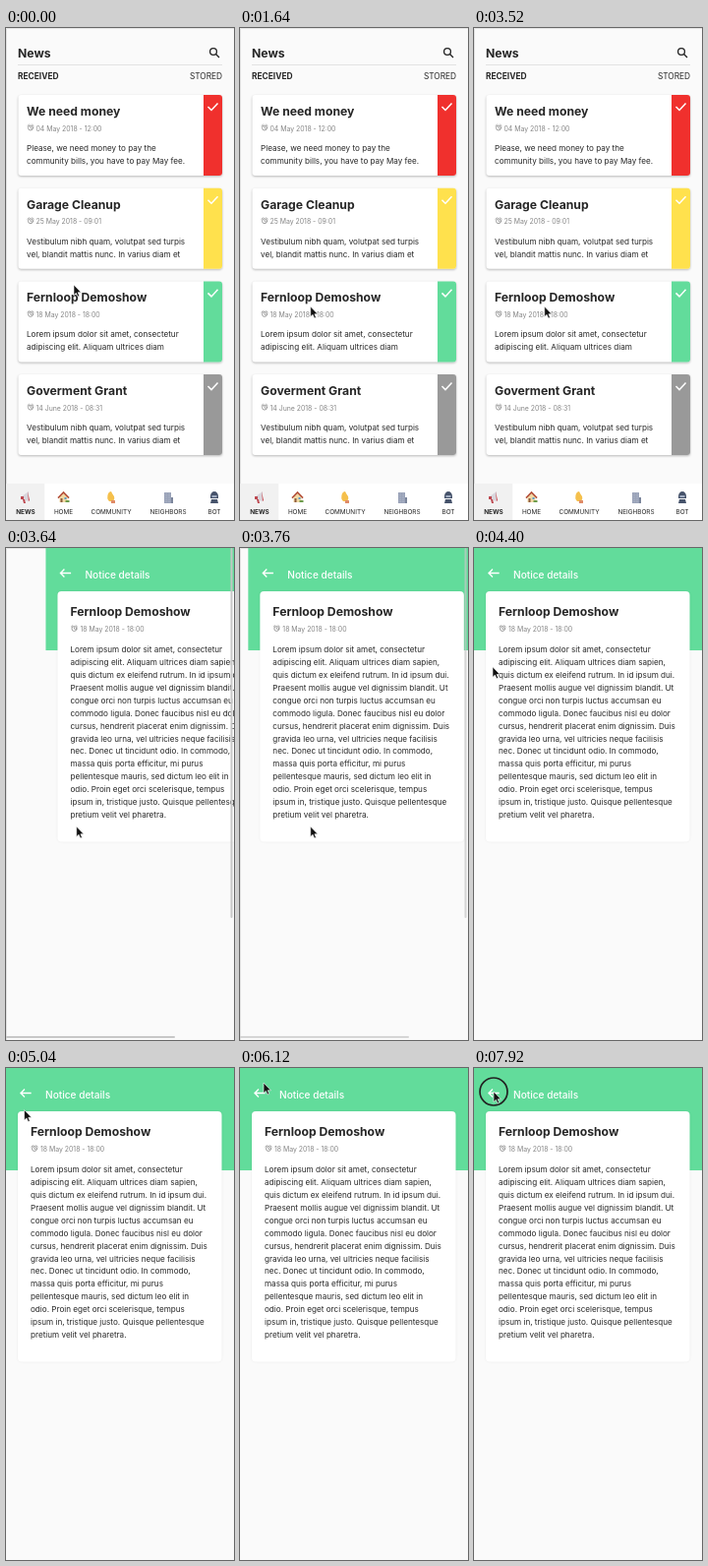
Write an HTML page that moves like this. It is 232 px wide and 500 px high and loops after 8000 ms.

```html
<!DOCTYPE html>
<html lang="en">
<head>
<meta charset="utf-8">
<title>News</title>
<style>
  html, body { margin: 0; overflow: hidden; background: #fafafa; }
  svg { display: block; width: 232px; height: 500px; font-family: Inter, sans-serif; }
  text { fill: #262626; white-space: pre; }
  .title { font-size: 12.2px; font-weight: 700; }
  .body { font-size: 8.15px; }
  .date { font-size: 6.9px; fill: #848484; }
  .tab { font-size: 6.4px; text-anchor: middle; }
  .card { fill: #fff; filter: drop-shadow(0 1px 1px #0004); }
  .line { fill: none; stroke-linecap: square; }
</style>
</head>
<body>
<svg viewBox="0 0 232 500">
  <rect width="232" height="500" fill="#fafafa"/>
  <path d="M.5 500V.5H232" fill="none" stroke="#e4e4e4"/>
  <g id="list">
    <text class="title" x="12" y="29.5">News</text>
    <g class="line" stroke="#222" stroke-width="1.3">
      <circle cx="211" cy="24" r="3.4"/><path d="M214 27l2.5 2.5"/>
    </g>
    <path d="M12 37.5H220" stroke="#e2e2e2"/>
    <text x="12" y="52" font-size="8.4" font-weight="700">RECEIVED</text>
    <text x="220" y="52" font-size="8.3" text-anchor="end">STORED</text>
    <g id="cards"></g>
    <path d="M0 463H232V500H0z" fill="#fff"/>
    <path d="M0 463H39.300V500H0z" fill="#f1f1f1"/>
    <g id="tabs"></g>
    <g transform="translate(20 477)">
      <path d="M-4 -1L3 -6V4L-4 2z" fill="#d9d6dc"/><path d="M2 -6l2 9-1 1z" fill="#c9424a"/>
      <path d="M-5 -1l3 0v3l-3 0zM-3 2l2 0 1 4h-2z" fill="#bd4850"/>
    </g>
    <g transform="translate(58.500 477)">
      <path d="M-4 -1L0 -5 4 -1V5H-4z" fill="#f2d9a5"/><path d="M-5 0L0 -5 5 0" class="line" stroke="#b5523c" stroke-width="1.6"/>
      <path d="M-3 1h2v4h-2z" fill="#8c5a3c"/><path d="M1 0h2v2h-2z" fill="#5a9ccb"/><path d="M2 3h4v2H2z" fill="#6c9c4c"/>
    </g>
    <g transform="translate(107 477)">
      <path d="M-3 -4q3 -4 4 0l2 3q1 4-2 5h-3q-3-3-1-8z" fill="#f5c04c"/><path d="M0 3h4v3H0z" fill="#df8b68"/>
    </g>
    <g transform="translate(165 477)">
      <path d="M-4 -5H3V6H-4z" fill="#99a2b8"/><path d="M3 0H5V6H3z" fill="#7b859b"/>
      <path d="M-2 -4V5M1 -4V5" stroke="#b4bccd" stroke-dasharray="1 1"/>
    </g>
    <g transform="translate(212 477)">
      <path d="M-4 -1a4 5 0 0 1 8 0v2h-8zM-3 2h6l1 4h-8z" fill="#46536b"/><path d="M-2.500 -1h5" stroke="#bdc9dc" stroke-width="1.5"/>
    </g>
  </g>
  <g id="details">
    <path d="M0 0H232V104H0z" fill="#62dc9b"/>
    <path d="M0 104H232V500H0z" fill="#fafafa"/>
    <path d="M25 25.500H15M18.500 22l-3.500 3.500 3.500 3.500" class="line" stroke="#fff" stroke-width="1.3"/>
    <text x="40" y="30.500" font-size="10.100" font-weight="500" style="fill:#fff">Notice details</text>
    <rect class="card" style="filter:drop-shadow(0 0 1px #0001)" x="12" y="44" width="207.500" height="254.500" rx="4"/>
    <g id="article"></g>
  </g>
  <g id="bars" fill="#c6c6c6">
    <rect y="496" width="172" height="2" rx="1"/>
    <rect x="228.500" width="2" height="376" rx="1"/>
  </g>
  <circle id="ring" r="14" fill="none" stroke="#222" stroke-width="1.700"/>
  <path id="cursor" d="M0 0V10.500L2.400 8.300 4 12 5.700 11.200 4.200 7.700H7.400z" fill="#111" stroke="#fff" stroke-width=".6"/>
</svg>
<script>
const $ = id => document.getElementById(id);
const text = (cls, x, y, s, extra = '') => `<text class="${cls}" x="${x}" y="${y}" ${extra}>${s}</text>`;
const clock = (x, y) => `<g class="line" stroke="#888" stroke-width=".8">
  <circle cx="${x}" cy="${y}" r="2.500"/><path d="M${x} ${y - 1.2}v1.400l1 .6M${x - 3} ${y - 2}l1.300-1.200M${x + 3} ${y - 2}l-1.300-1.200"/></g>`;

const vestibulum = ['Vestibulum nibh quam, volutpat sed turpis', 'vel, blandit mattis nunc. In varius diam et'];
const event = 'Fernloop Demoshow', eventDate = '18 May 2018 - 18:00';
const news = [
  ['We need money', '04 May 2018 - 12:00', '#f0302d',
    ['Please, we need money to pay the', 'community bills, you have to pay May fee.']],
  ['Garage Cleanup', '25 May 2018 - 09:01', '#ffe14d', vestibulum],
  [event, eventDate, '#62dc9b',
    ['Lorem ipsum dolor sit amet, consectetur', 'adipiscing elit. Aliquam ultrices diam']],
  ['Goverment Grant', '14 June 2018 - 08:31', '#999', vestibulum]
];
$('cards').innerHTML = news.map(([title, date, color, lines], i) => `
  <g transform="translate(12.500 ${68 + i * 94.7})">
    <rect class="card" width="207.500" height="82" rx="3"/>
    <path d="M188.500 0h16q3 0 3 3v76q0 3-3 3h-16z" fill="${color}"/>
    <path d="M193.500 12.500l3 3 6-6.500" class="line" stroke="#fff" stroke-width="1.500"/>
    ${text('title', 8.5, 21, title)}${clock(12.5, 33.5)}${text('date', 18, 36.7, date)}
    ${lines.map((s, n) => text('body', 8.5, 57 + n * 13, s)).join('')}
  </g>`).join('');

$('tabs').innerHTML = [['NEWS', 20], ['HOME', 58.5], ['COMMUNITY', 107], ['NEIGHBORS', 165], ['BOT', 212]]
  .map(([s, x], i) => text('tab', x, 493.5, s, i ? '' : 'font-weight="700"')).join('');

const article = `Lorem ipsum dolor sit amet, consectetur
adipiscing elit. Aliquam ultrices diam sapien,
quis dictum ex eleifend rutrum. In id ipsum dui.
Praesent mollis augue vel dignissim blandit. Ut
congue orci non turpis luctus accumsan eu
commodo ligula. Donec faucibus nisl eu dolor
cursus, hendrerit placerat enim dignissim. Duis
gravida leo urna, vel ultricies neque facilisis
nec. Donec ut tincidunt odio. In commodo,
massa quis porta efficitur, mi purus
pellentesque mauris, sed dictum leo elit in
odio. Proin eget orci scelerisque, tempus
ipsum in, tristique justo. Quisque pellentesque
pretium velit vel pharetra.`;
$('article').innerHTML = text('title', 25, 69, event) + clock(29, 82) + text('date', 35, 85, eventDate)
  + article.split('\n').map((s, i) => text('body', 25, 106 + i * 12.93, s)).join('');

// Pointer path: time, x, y
const path = [[0, 69, 261], [640, 69, 261], [1080, 71.7, 283], [3920, 71.7, 283], [4160, 50, 225],
  [4320, 28, 157], [4400, 19, 121], [4640, 12, 76], [4800, 12, 76], [5240, 24, 15],
  [6120, 24, 15], [6480, 20, 24], [8000, 20, 24]];

function pointerAt(t) {
  const i = path.findIndex(p => p[0] > t);
  const [a, b] = [path[i - 1], path[i]];
  const k = (t - a[0]) / (b[0] - a[0]);
  return [a[1] + (b[1] - a[1]) * k, a[2] + (b[2] - a[2]) * k];
}

const show = (id, on) => $(id).style.display = on ? '' : 'none';

function draw(now) {
  const t = now % 8000;
  const opened = t >= 3560;
  const left = 41 * Math.exp((3640 - t) / 76);
  const at = `translate(${pointerAt(t)})`;
  show('list', !opened);
  show('details', opened);
  show('bars', opened && t < 4080);
  show('ring', t >= 3360 && t < 3520 || t >= 7840);
  $('details').setAttribute('transform', `translate(${left < .5 ? 0 : left} 0)`);
  $('bars').setAttribute('opacity', Math.min(1, (4080 - t) / 450));
  $('cursor').setAttribute('transform', at);
  $('ring').setAttribute('transform', at);
  requestAnimationFrame(() => draw(performance.now()));
}
draw(performance.now());
</script>
</body>
</html>
```
